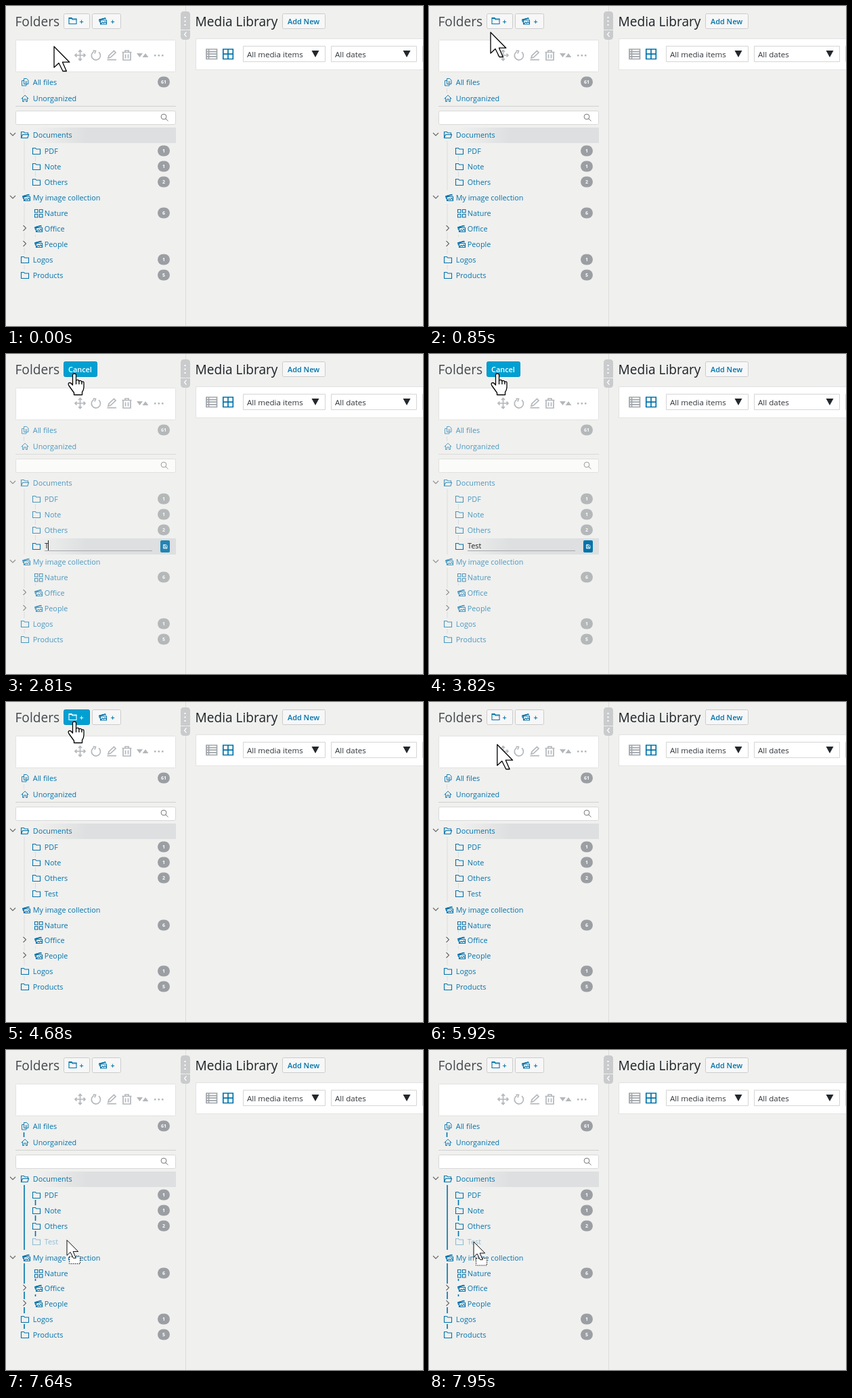
An HTML page for the animation above (8000 ms loop, 616 px wide and 474 px high).

```html
<!DOCTYPE html>
<html lang="en">
<head>
<meta charset="utf-8">
<title>Media folders</title>
<style>
html, body { margin: 0; width: 100%; height: 100%; overflow: hidden; background: #f0f0ef; }
svg { display: block; width: 616px; height: 474px; font: 10.8px "Open Sans", "Noto Sans", sans-serif; fill: #0073aa; }
.h { font-size: 19.1px; fill: #1d2327; }
.b { font-size: 10.9px; font-weight: 600; }
.s { font-size: 11.6px; fill: #32373c; }
.n { font-size: 7px; font-weight: 700; fill: #fff; text-anchor: middle; }
.btn { fill: #f7f7f7; stroke: #ccc; }
.box { fill: #fff; stroke: #e2e2e2; }
.line { fill: none; stroke: currentColor; stroke-width: 1.1; }
.thin { fill: none; stroke: currentColor; stroke-width: .9; }
.bold { fill: none; stroke: currentColor; stroke-width: 1.7; }
.gray { color: #b4b8bc; fill: #b4b8bc; }
.cur { fill: #fff; stroke: #000; stroke-width: 1.3; stroke-linejoin: round; }
</style>
</head>
<body>
<svg viewBox="0 0 616 474" color="#0073aa">
  <defs>
    <linearGradient id="fade">
      <stop offset=".12" stop-color="#dddfe0" stop-opacity="0"/>
      <stop offset=".45" stop-color="#dddfe0"/>
    </linearGradient>
    <path id="folder" class="line" d="M-5.5-4.500h4l1.200 1.500h5.800v7.500h-11z"/>
    <path id="open" class="line" d="M-5.500 4.500v-9h4l1.200 1.500h4.800v2.500M-5.500 4.500l2-5h9l-1.600 5z"/>
    <g id="images" class="line">
      <path d="M-4.500 1.500l-.9-3.500L3.800-4.600l.5 1.800"/>
      <path d="M-5.300-1.900L3.800-4.500" stroke-width="1.800"/>
      <path d="M-3.500-1.500h9v6h-9zM-3 4l2.600-2.600 1.800 1.400 1.800-2 2 2"/>
    </g>
    <path id="tiles" class="line" d="M-5.500-5.500h4.500v4.500h-4.500zM1.500-5.500h4.500v4.500h-4.500zM-5.500 1.500h4.500v4.500h-4.500zM1.500 1.500h4.500v4.500h-4.500z"/>
    <path id="files" class="thin" d="M-1.500-5.500h4l2.500 2.500v5.500h-6.500zM-1.500-2.500h-3v7.500h6.500v-2.500M.3-1h3M.3 .8h3"/>
    <path id="home" class="thin" d="M-5.500.5L0-4.800 5.500.5M-3.500-1v5.500h2v-3.500h3v3.500h2v-5.500"/>
    <path id="down" d="M-4-2L0 2l4-4" fill="none" stroke="#666" stroke-width="1.100"/>
    <path id="right" d="M-2-4L2 0l-4 4" fill="none" stroke="#666" stroke-width="1.100"/>
    <path id="arrow" class="cur" d="M0 0v31l7-6.500 6 12h5.300l-5.800-13.300h10.300z"/>
    <g id="hand" class="cur">
      <path d="M-3 15V1.500Q-3-1-.5-1T2 1.500V9.600Q2 8.400 4.200 8.400T6.400 10.600Q6.400 9.400 8.200 9.400T10.400 11.600Q10.400 10.800 12 10.800T13.500 13V19Q13.500 23 11 26.500V30.500H-1V27.500L-8.500 17Q-10.500 13.500-8 12.600Q-6 12-3 16Z"/>
      <path d="M2 9v6M6.400 10.500V15M10.400 11.500V15" fill="none"/>
    </g>
    <g id="drag">
      <path d="M3.500 24.500h16v10.500h-16z" fill="#fff" stroke="#000" stroke-dasharray="1.5 1.5"/>
      <use href="#arrow" transform="scale(.73)"/>
    </g>
  </defs>

  <path d="M265.500 0V474" stroke="#dcdcdc"/>
  <path d="M258 13q0-5 5-5h4q5 0 5 5v22h-14zM258 36h14v9q0 5-5 5h-4q-5 0-5-5z" fill="#c9cbcc"/>
  <path d="M264.500 16v2m0 3.500v2m0 3.500v2" stroke="#fff" stroke-width="2"/>
  <path d="M266.500 38.500l-3 3.500 3 3.500" fill="none" stroke="#fff" stroke-width="1.200"/>

  <text class="h" x="13.500" y="30" style="fill:#43484d">Folders</text>
  <text class="h" x="279.500" y="30">Media Library</text>
  <rect class="btn" x="408.500" y="11.500" width="63" height="22" rx="2"/>
  <text class="b" x="416" y="27">Add New</text>

  <rect class="box" x="14.500" y="50.500" width="236" height="47" rx="1"/>
  <g class="gray">
    <path class="bold" d="M109.500 66v14M102.500 73h14M107 68l2.500-2.500 2.500 2.500M107 78l2.500 2.500 2.500-2.500M104.500 70.500L102 73l2.500 2.500M114.500 70.500L117 73l-2.500 2.500"/>
    <path class="bold" d="M137 68.200a6.600 6.600 0 1 1-7-.8M128.500 66l4 .5-1.500 4"/>
    <path class="bold" d="M149.500 79.700h13.500M151 77l1-3.500 7.500-7 2.500 2.500-7.500 7z"/>
    <path class="bold" d="M171.500 68.500h14M176 68v-2h5v2M173 69v11h11V69M176.500 71.500v6M180.500 71.500v6"/>
    <path d="M193 70h9l-4.500 6zM201.500 76h9l-4.500-6z"/>
    <path d="M219 72h2.500v2.500H219zm5.500 0h2.500v2.500h-2.500zm5.500 0h2.500v2.500H230z"/>
  </g>

  <path class="box" d="M620 48.500H280.500v46H620"/>
  <path class="bold" color="#a0a5aa" d="M296 64h15.500v14.500H296zM299.500 64v14.500M296 67.600h15.500M296 71.200h15.500M296 74.800h15.500"/>
  <path class="bold" d="M320.800 64h14.500v14.500h-14.500zM328 64v14.500M320.800 71.200h14.500"/>
  <path class="box" d="M350.500 59.500h121v23h-121zM480.500 59.500h126v23h-126zM620 59.500h-4.500v23h4.500" style="stroke:#d5d5d5"/>
  <text class="s" x="356" y="76">All media items</text>
  <text class="s" x="486" y="76">All dates</text>
  <path d="M451.500 66h11l-5.500 10zM586.500 66h11l-5.500 10z" fill="#23282d"/>
  <g id="live"></g>
</svg>

<script>
const LOOP = 8000, live = document.getElementById('live');

// y, level, icon, label, count, expander
const ROWS = [
  [113, 0, 'files', 'All files', 61],
  [137, 0, 'home', 'Unorganized'],
  [191, 0, 'open', 'Documents', 0, 'down'],
  [215, 1, 'folder', 'PDF', 1],
  [238, 1, 'folder', 'Note', 1],
  [261, 1, 'folder', 'Others', 2],
  [284, 0, 'images', 'My image collection', 0, 'down'],
  [307, 1, 'tiles', 'Nature', 6],
  [330, 1, 'images', 'Office', 0, 'right'],
  [353, 1, 'images', 'People', 0, 'right'],
  [376, 0, 'folder', 'Logos', 1],
  [399, 0, 'folder', 'Products', 5],
];

const clamp = v => Math.min(1, Math.max(0, v));
const mix = (a, b, p) => a + (b - a) * p;
const smooth = p => p * p * (3 - 2 * p);
// number of steps taken at t when n steps are spread from a to b
const steps = (t, a, b, n) => t < a ? 0 : Math.min(n, 1 + Math.floor((t - a) / (b - a) * (n - 1) + .1));
const use = (id, x, y) => `<use href="#${id}" x="${x}" y="${y}"/>`;
const text = (x, y, s, more = '') => `<text x="${x}" y="${y}" ${more}>${s}</text>`;
const rect = (x, y, w, h, more) => `<rect x="${x}" y="${y}" width="${w}" height="${h}" ${more}/>`;
const band = (y, h) => rect(14, y, 237, h, 'fill="url(#fade)"');

function row([y, level, icon, label, count, expander]) {
  const wide = icon == 'images' || icon == 'tiles';
  const x = 28 + 17 * level + (wide ? 2 + level : 0);
  let s = use(icon, x, y) + text(39.8 + 17 * level, y + 4, label);
  if (expander) s += use(expander, 10 + 17.5 * level, y - 1);
  if (count) s += rect(224, y - 8.5, 18, 16, 'rx="8" fill="#9b9fa3"') + text(233, y + 2.3, count, 'class="n"');
  return s;
}

function treeLines(shift, added, strong) {
  const a = y => y + shift;
  let d = `M26.5 122v7M27 200V${a(273)}M27 ${a(293)}V${a(323)}M27 ${a(335)}V${a(346)}M27 ${a(358)}V${a(367)}M27 ${a(383)}v7`;
  for (const y of [222, 245, ...(added ? [268] : [])]) d += `M43.5 ${y}v8`;
  d += `M43.5 ${a(316)}v3M43.5 ${a(339)}v3`;
  return `<path d="${d}" fill="none" stroke="${strong ? '#0073aa' : '#dcdddd'}" stroke-width="${strong ? 1.6 : 1}"/>`;
}

function search() {
  return '<path d="M14 148.5H251" stroke="#d0d0d0"/>' + rect(14.5, 155.5, 236, 20, 'rx="2" fill="#fff" stroke="#d8d8d8"') +
    '<path d="M235.8 166.8l3.7 3.7M236.900 164a3.900 3.900 0 1 0-7.800 0a3.900 3.900 0 1 0 7.800 0" fill="none" stroke="#777"/>';
}

function buttons(hover, edit) {
  const blue = 'fill="#00a0d2" stroke="#008ec2" rx="2"', plain = 'class="btn" rx="2"';
  if (edit) return rect(85.5, 11.5, 49, 22, blue) + text(92, 27, 'Cancel', 'class="b" fill="#fff"');
  const c = hover ? '#fff' : '#0073aa';
  return rect(85.5, 11.5, 38, 22, hover ? blue : plain) +
    `<g color="${c}" fill="${c}">${use('folder', 98.5, 22)}<path d="M93 18.5h4.5v1.500h7" fill="none" stroke="${c}"/>` +
    text(108.5, 26.5, '+', 'class="b"') + '</g>' +
    rect(127.5, 11.5, 42, 22, plain) + use('images', 143, 22.5) + text(154.5, 26.5, '+', 'class="b"');
}

function editor(t) {
  const n = t < 2810 ? 0 : t < 3120 ? 1 : t < 3270 ? 2 : 4;
  const caret = !(t >= 1800 && t < 2260 || t >= 3820 && t < 4370);
  const save = t < 2810 ? .68 : t < 2890 ? .84 : 1;
  let s = band(273, 24) + use('folder', 45, 285) +
    '<path d="M57 291.5H216" stroke="#a5a8aa"/>' + text(57, 288, 'Test'.slice(0, n), 'fill="#222"');
  if (caret) s += rect([57, 62, 67, 72, 75.5][n], 276, n ? 1 : 2, 15, `fill="${n ? '#222' : '#258a25'}"`);
  return s + `<g opacity="${save}">` + rect(228, 276, 14, 18, 'rx="2"') +
    '<path d="M232.5 282.5h4l1.5 1.5v4h-5.5zM234 282.5v2h2M234 288v-2h2.500v2" fill="none" stroke="#fff" stroke-width=".9"/></g>';
}

function cursor(t) {
  if (t < 1010) {
    const p = steps(t, 530, 1250, 10) / 7;
    return ['arrow', mix(71, 99, p), mix(60, 30.6, p)];
  }
  if (t >= 7640) {
    const p = steps(t, 7640, 7950, 5) / 5;
    return ['drag', mix(96, 66, p), mix(281, 284, p)];
  }
  const p = smooth(clamp(steps(t, 5840, 6630, 11) / 8.8));
  const y = mix(30, 281, p);
  const onLink = y < 35 || y > 100 && y < 146 || y > 180;
  return [onLink ? 'hand' : 'arrow', mix(101.5, 96, p), y];
}

function scene(t) {
  const edit = t >= 1090 && t < 4520, added = t >= 4520;
  const dim = 1 - .3 * (t < 4520 ? steps(t, 1090, 1250, 3) / 3 : 1 - steps(t, 4520, 4680, 3) / 3);
  const [shape, x, y] = cursor(t);
  const shift = v => v < 280 ? 0 : edit ? 24 : !added ? 0 : v < 310 ? 24 : 23;
  const rows = ROWS.map(([v, ...rest]) => row([v + shift(v), ...rest])).join('');
  let s = buttons(t >= 1010 && y < 35, edit);
  if (!edit) s += band(180, 23);
  s += treeLines(shift(400), edit || added, t >= 7640) + `<g opacity="${dim}">${search()}${rows}</g>`;
  if (edit) s += editor(t);
  if (added) s += `<g opacity="${t < 7090 ? 1 : .4}">${row([284, 1, 'folder', 'Test'])}</g>`;
  return s + use(shape, x, y);
}

let last;
function tick() {
  const s = scene(performance.now() % LOOP);
  if (s !== last) live.innerHTML = last = s;
  requestAnimationFrame(tick);
}
tick();
</script>
</body>
</html>
```
